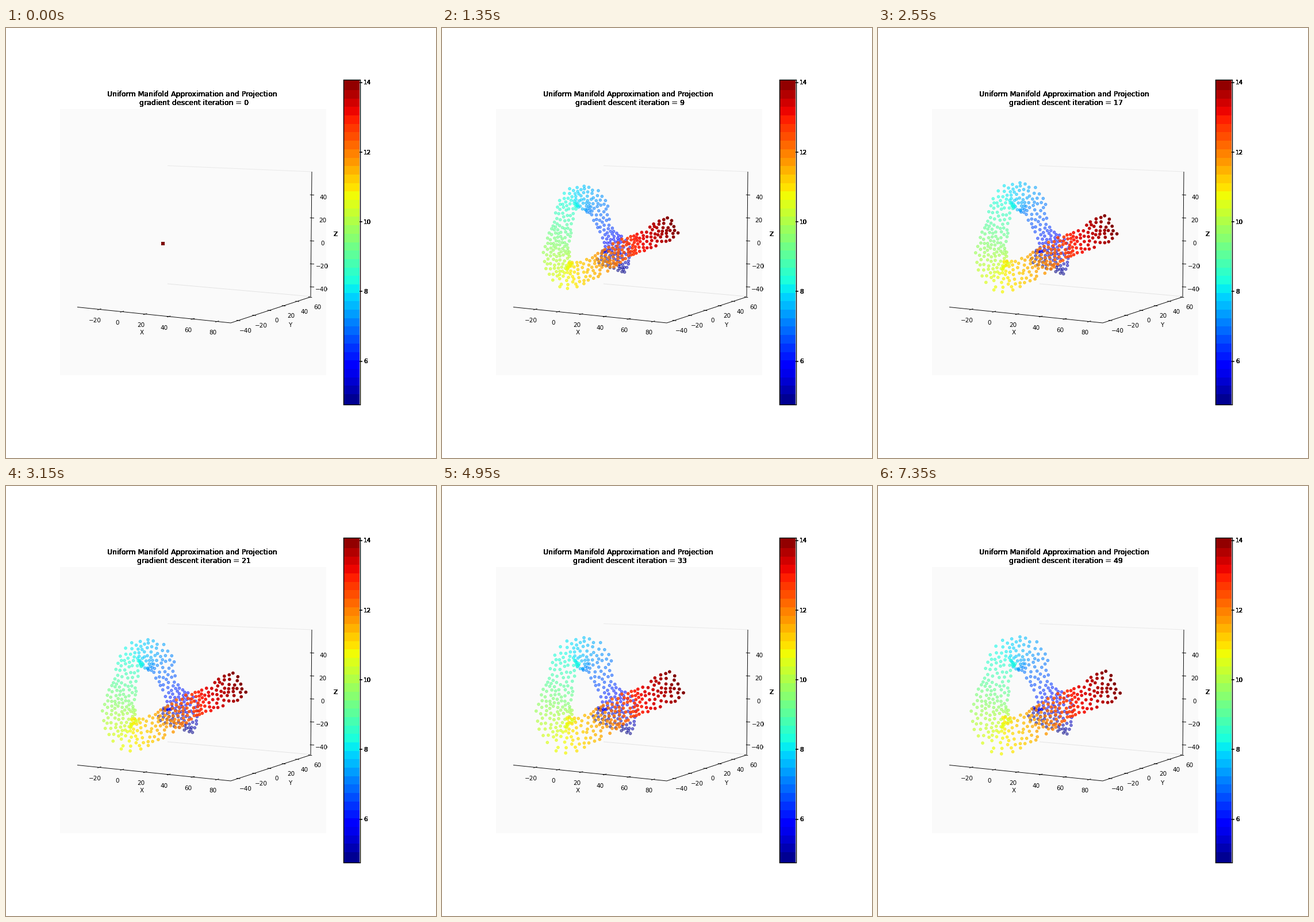
These frames come from a looping animation (748x748 px, 7500 ms). A matplotlib script:

```python
import matplotlib.pyplot as plt
import numpy as np
from matplotlib.animation import FuncAnimation
from matplotlib.patches import Rectangle
from matplotlib.transforms import Bbox

SIZE, FRAMES, STEP = 748, 50, 150
START = np.array([273, 375])
COUNT = 500

plt.rcParams["font.family"] = "DejaVu Sans"
jet = plt.get_cmap("jet")

fig = plt.figure(figsize=(10, 10), dpi=SIZE / 10, facecolor="white")
ax = fig.add_axes([0, 0, 1, 1])
ax.set(xlim=(0, SIZE), ylim=(SIZE, 0))
ax.axis("off")


def line(x0, y0, x1, y1, color="black", width=0.9):
    ax.plot([x0, x1], [y0, y1], color=color, lw=width, solid_capstyle="butt")


def label(x, y, s, size=10, ha="center", copies=1):
    """Text with vertical centre y; stacked copies harden its edges."""
    s = str(s).replace("-", "\u2212")
    return [ax.text(x, y + 0.38 * size, s, size=size, ha=ha, va="baseline",
                    zorder=5) for _ in range(copies)]


def floor_axis(start, end, first, step, growth, low, offset, slant):
    """Axis line with six ticks whose spacing follows the perspective."""
    line(*start, *end)
    slope = (end[1] - start[1]) / (end[0] - start[0])
    for i in range(6):
        x = first + step * i + growth * i * i
        y = start[1] + (x - start[0]) * slope
        line(x - 3, y - slant, x + 3.5, y + slant)
        label(x + offset[0], y + offset[1], low + 20 * i)


# Box of the 3D plot
ax.add_patch(Rectangle((94, 141), 463.5, 463, color="#fafafa", lw=0))
line(281, 239.5, 532, 250, "#e8e8e8")
line(281, 445, 530, 467, "#e2e2e2")
floor_axis((124, 485.5), (391, 513), 162, 39.2, 0.36, -20, (-7.5, 19), -0.9)
floor_axis((391, 513), (529.5, 468), 404, 28.2, -0.65, -40, (12.7, 17.4), 0.5)

line(530, 467.5, 532, 250)
right_side = Bbox([[558, 0], [SIZE, SIZE]])
for i in range(5):
    y = 290.3 + 40 * i
    line(528.8, y - 0.2, 536, y + 0.3)
    spot = 551.7 - 0.6 * i, y + 4.2, 40 - 20 * i
    label(*spot)
    for text in label(*spot, copies=7):
        text.set_clip_on(True)
        text.set_clip_box(right_side)

label(236, 529, "X")
label(494, 516, "Y")
label(573, 358, "Z", copies=8)

# Colour bar
edges = np.r_[90, np.linspace(108, 637, 37), 655]
for top, bottom in zip(edges[:-1], edges[1:]):
    mid = (655 - (top + bottom) / 2) / 565
    ax.add_patch(Rectangle((587, top), 28.5, bottom - top, color=jet(mid),
                           lw=0, antialiased=False))
ax.add_patch(Rectangle((586.7, 90), 29, 565.3, fill=False, ec="black",
                       lw=1.4, zorder=4))
for v in range(6, 15, 2):
    y = 94.5 + (14 - v) * 60.63
    line(615.5, y, 620, y, width=1.5)
    label(621.8, y, v, ha="left", copies=8)

# Title
label(323.5, 114, "Uniform Manifold Approximation and Projection", 12, copies=8)
counter = label(327.3, 129.5, "", 12, copies=8)

# Ribbon spine from blue to red, evenly spaced in colour: x, y, half width
KEYS = np.array([
    (294, 420, 38), (306, 386, 34), (286, 350, 16), (263, 299, 30),
    (222, 292, 25), (206, 344, 25), (195, 392, 33), (212, 433, 33),
    (268, 416, 26), (312, 388, 25), (356, 370, 23), (412, 341, 36),
])


def smooth(u):
    """Cubic Hermite curve through KEYS, u from 0 to 1."""
    s = u * (len(KEYS) - 1)
    i = np.clip(s.astype(int), 0, len(KEYS) - 2)
    f = (s - i)[:, None]
    slope = np.gradient(KEYS, axis=0)
    return ((1 + 2 * f) * (1 - f) ** 2 * KEYS[i] + f * f * (3 - 2 * f) * KEYS[i + 1]
            + f * (1 - f) ** 2 * slope[i] - f * f * (1 - f) * slope[i + 1])


def half_width(u):
    """Width along the ribbon, rounded off at the red end."""
    cap = np.clip(u - 0.94, 0, None) / 0.08
    return smooth(u)[:, 2] * np.sqrt(1 - cap ** 2)


def scatter_evenly(n, length=620, tries=40):
    """Best-candidate sampling of the unrolled ribbon, sorted by colour."""
    rng = np.random.default_rng(7)
    pts = np.empty((0, 2))
    for _ in range(n):
        u, v = rng.random(tries), rng.uniform(-1, 1, tries)
        cand = np.c_[u * length, v * half_width(u)]
        gap = ((cand[:, None] - pts) ** 2).sum(2).min(1, initial=1e9)
        pts = np.vstack([pts, cand[gap.argmax()]])
    pts = pts[pts[:, 0].argsort()]
    return pts[:, 0] / length, pts[:, 1:]


u, side = scatter_evenly(COUNT)
spine = smooth(u)[:, :2] - START
tangent = (smooth(u + 1e-3) - smooth(u - 1e-3))[:, :2]
normal = tangent[:, ::-1] * (1, -1) / np.hypot(*tangent.T)[:, None]
across = normal * side

# Near points are opaque, far ones faint
colors = jet(u)
colors[:, 3] = 0.5 + 0.5 * u ** 2.5
dots = ax.scatter(*START.repeat(COUNT).reshape(2, -1), s=20, c=colors,
                  edgecolors=colors, linewidths=1, zorder=3)


def update(k):
    # Progress under a learning rate that falls linearly to zero
    done = 1 - (1 - k / (FRAMES - 1)) ** 2
    dots.set_offsets(START + done ** 0.052 * spine + done ** 0.325 * across)
    for text in counter:
        text.set_text(f"gradient descent iteration = {k}")
    return [dots, *counter]


anim = FuncAnimation(fig, update, frames=FRAMES, interval=STEP, repeat=True,
                     repeat_delay=0, blit=False)
plt.show()
```
